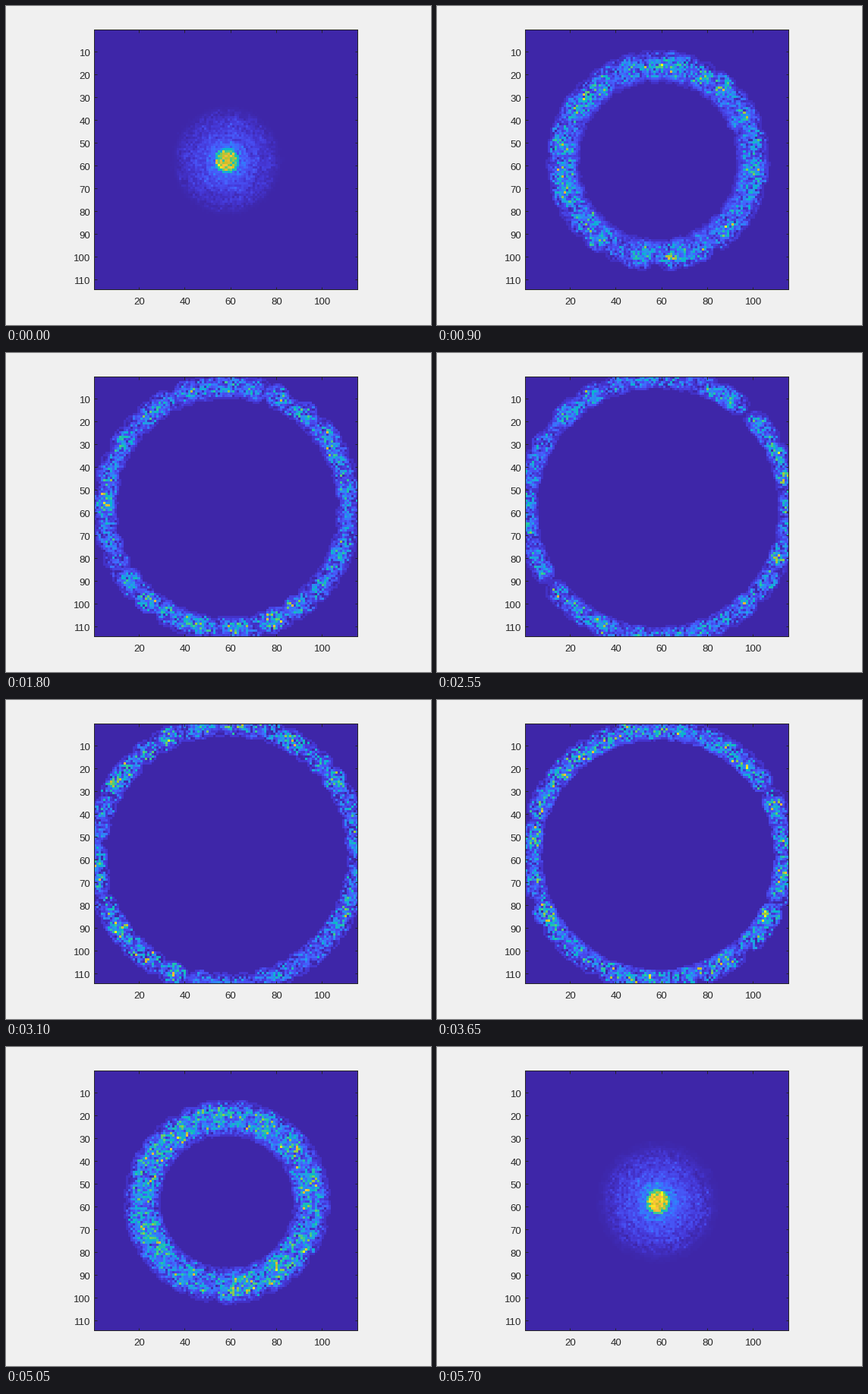
A matplotlib script that plays this animation: 560x420 px, repeating every 5.75 s.

```python
import numpy as np
import matplotlib.pyplot as plt
from matplotlib.animation import FuncAnimation
from matplotlib.colors import LinearSegmentedColormap
from matplotlib.transforms import ScaledTranslation

W, H, DPI = 560, 420, 100
LEFT, RIGHT, TOP, BOTTOM = 116, 463, 31, 373
NX, NY, NZ = 115, 114, 115
CENTER = np.array([57.4, 57.1, 57.4])  # x, y, z of the shell
SHELL_R, BALL_R, CORE_R = 57.4, 5.4, 4.5
RINGS, PER_RING = 37, 60
INK = "#262626"

plt.rcParams["font.family"] = "Liberation Sans"

PARULA = LinearSegmentedColormap.from_list("parula", [
    (min(i * 4 / 63, 1), c) for i, c in enumerate(
        "#3e26a8 #4537d5 #484df0 #4563fd #327cfc #2b91ef #20a5e3 #08b5d0 #19bfb6 "
        "#37c897 #64cd6f #9dc943 #d1bf27 #f8ba3d #fccf30 #f5e924 #f9fb15".split())])


def px(n):
    """Pixels to points."""
    return n * 72 / DPI


def add_ball(vol, pos, gain, rng):
    """Add a ball with a speckled core and a faint, even rim."""
    size = np.array([NX, NY, NZ])
    lo = np.maximum(np.floor(pos - BALL_R).astype(int), 0)
    hi = np.minimum(np.ceil(pos + BALL_R).astype(int) + 1, size)
    if np.any(hi <= lo):
        return
    x, y, z = (np.arange(a, b) - p for a, b, p in zip(lo, hi, pos))
    dist = np.sqrt(z[:, None, None] ** 2 + y[:, None] ** 2 + x ** 2)
    speckle = gain * rng.random(dist.shape) ** 3
    ball = np.where(dist < CORE_R, speckle, 0.12 * (dist < BALL_R))
    vol[lo[2]:hi[2], lo[1]:hi[1], lo[0]:hi[0]] += ball


def build_volume():
    """Balls on rings of latitude, equally many per ring, so they pile up at the poles."""
    rng = np.random.default_rng(7)
    vol = np.zeros((NZ, NY, NX))
    for theta in np.linspace(0, np.pi, RINGS):
        steps = np.arange(PER_RING) + rng.random() + rng.normal(0, 0.35, PER_RING)
        for phi in steps * 2 * np.pi / PER_RING:
            way = np.array([np.sin(theta) * np.cos(phi),
                            np.sin(theta) * np.sin(phi),
                            -np.cos(theta)])
            add_ball(vol, CENTER + SHELL_R * way, rng.uniform(0.5, 1.2), rng)
    return vol


volume = build_volume()

fig = plt.figure(figsize=(W / DPI, H / DPI), dpi=DPI, facecolor="#f0f0f0")
ax = fig.add_axes([LEFT / W, 1 - BOTTOM / H, (RIGHT - LEFT) / W, (BOTTOM - TOP) / H])
image = ax.imshow(volume[0], cmap=PARULA, aspect="auto", interpolation="nearest",
                  extent=(0.5, NX + 0.5, NY + 0.5, 0.5))
ax.set_xticks(range(20, 101, 20))
ax.set_yticks(range(10, 111, 10))
ax.tick_params(direction="in", top=True, right=True, length=px(3.5), width=px(1),
               color=INK, labelcolor=INK, labelsize=px(13.2))
ax.tick_params(axis="x", pad=px(11))
ax.tick_params(axis="y", pad=px(4.5))
for spine in ax.spines.values():
    spine.set(linewidth=px(1), color=INK)


def nudge(labels, dx, dy):
    shift = ScaledTranslation(dx / DPI, -dy / DPI, fig.dpi_scale_trans)
    for label in labels:
        label.set_transform(label.get_transform() + shift)


nudge(ax.get_xticklabels(), 0.7, 0)
nudge(ax.get_yticklabels(), 0, 1.5)


def draw(i):
    layer = volume[i]
    image.set_data(layer)
    image.set_clim(0, layer.max())
    return [image]


anim = FuncAnimation(fig, draw, frames=NZ, interval=50, repeat=True, repeat_delay=0)
plt.show()
```
